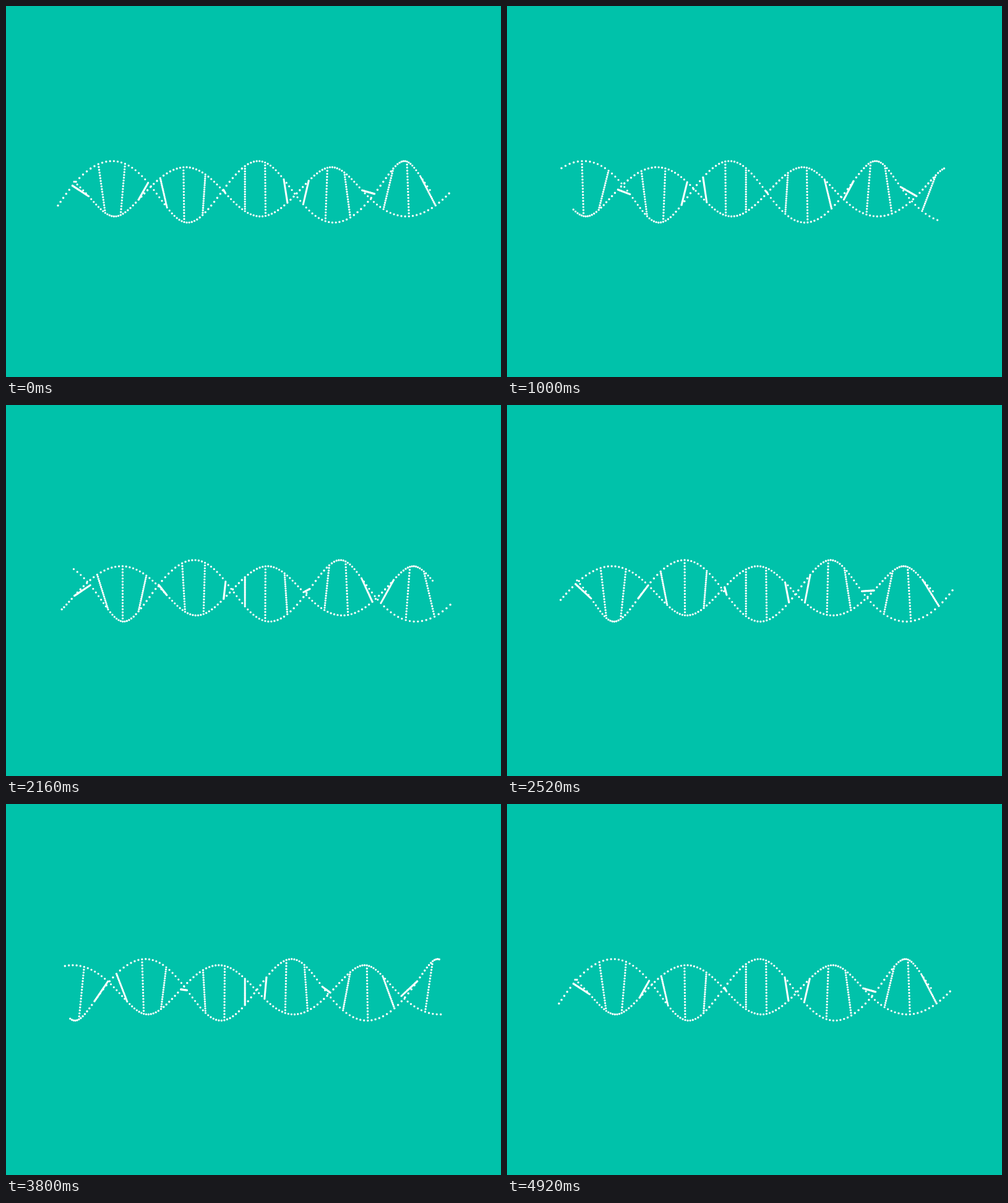
Recreate the animation shown at these times as an HTML page with a canvas. Size 800 px wide and 600 px high, loop 4960 ms.

```html
<!DOCTYPE html>
<html lang="en">
<head>
<meta charset="utf-8">
<title>Dotted helix</title>
<style>
  html, body { margin: 0; width: 100%; height: 100%; overflow: hidden; background: #00c2aa; }
  canvas { display: block; }
</style>
</head>
<body>
<canvas id="stage" width="800" height="600"></canvas>
<script>
  const ctx = document.getElementById('stage').getContext('2d');
  const TAU = Math.PI * 2;
  const ORIGIN = { x: 386.2, y: 300.5 };
  const DEPTH = 900;               // camera distance
  const STEP_X = 4.707;            // gap between columns
  const STEP_R = 4.965;            // gap between dots along a rung
  const FIRST = -61, LAST = 67;    // columns
  const TOP = -10, BOTTOM = 8;     // dots along a rung
  const PER_TURN = 50, RUNG_EVERY = 7, SHIFT = 5;
  const TICK = 40, TICKS = 124;    // the last tick repeats the first pose

  function dot(col, row, angle) {
    const r = row * STEP_R;
    const scale = DEPTH / (DEPTH - r * Math.sin(angle));
    const x = ORIGIN.x + col * STEP_X * scale;
    const y = ORIGIN.y + r * Math.cos(angle) * scale;
    const size = 1.7 * scale;
    ctx.moveTo(x + size, y);
    ctx.arc(x, y, size, 0, TAU);
  }

  function draw(turn) {
    ctx.clearRect(0, 0, 800, 600);
    ctx.fillStyle = '#fff';
    ctx.beginPath();
    for (let col = FIRST; col <= LAST; col++) {
      const angle = ((col - SHIFT) / PER_TURN + turn) * TAU;
      const gap = col % RUNG_EVERY === 0 ? 1 : BOTTOM - TOP;
      for (let row = TOP; row <= BOTTOM; row += gap) dot(col, row, angle);
    }
    ctx.fill();
  }

  const start = performance.now();
  function frame() {
    const tick = Math.floor((performance.now() - start) / TICK) % TICKS;
    draw(tick / (TICKS - 1));
    requestAnimationFrame(frame);
  }
  frame();
</script>
</body>
</html>
```
